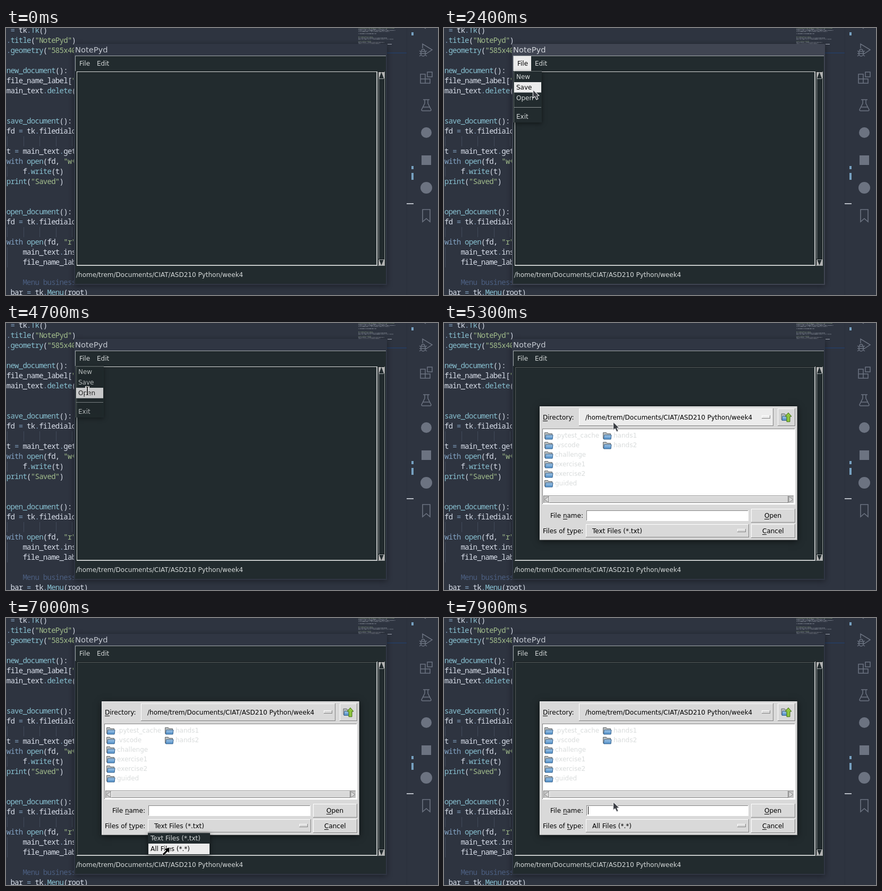
Animation of 813 by 503 pixels, one loop 8000 ms. Source, as an HTML page with a canvas:

```html
<!DOCTYPE html>
<html lang="en">
<head>
<meta charset="utf-8">
<title>Text editor demo</title>
<style>
html, body { margin: 0; width: 100%; height: 100%; overflow: hidden; background: #2e3440; }
canvas { display: block; }
</style>
</head>
<body>
<canvas id="stage" width="813" height="503"></canvas>
<script>
const g = document.getElementById('stage').getContext('2d');
const LOOP = 8000, STEP = 100;
const UI = '12px "DejaVu Sans", sans-serif';
const TITLE = '14.67px "DejaVu Sans", sans-serif';
const MONO = '14px "Noto Sans Mono", monospace';
const DARK = '#222b2e', PALE = '#d5d9d9', FACE = '#d9d9d9', HOVER = '#ececec', ICON = '#6c7381';
const PATH = '/home/trem/Documents/CIAT/ASD210 Python/week4';

// Pointer track: time, x, y
const TRACK = [
  [400, 92, 4], [1100, 150, 73], [1800, 150, 73], [2000, 166, 84], [2100, 166, 84],
  [2400, 167, 116], [2600, 167, 116], [2800, 155, 112], [3500, 155, 112], [3700, 151, 128],
  [4600, 151, 128], [4700, 153, 128], [5000, 153, 128], [5300, 318, 186], [5400, 318, 186],
  [6300, 300, 388], [6700, 300, 388], [7000, 308, 432], [7200, 308, 432], [7500, 318, 346], [8000, 318, 346]
];

const CODE = {
  0: ' = tk.Tk()', 1: '.title("NotePyd")', 2: '.geometry("585x40',
  4: 'new_document():', 5: 'file_name_label["', 6: 'main_text.delete(',
  9: 'save_document():', 10: 'fd = tk.filedialog', 12: 't = main_text.get',
  13: 'with open(fd, "w+"', 14: '    f.write(t)', 15: 'print("Saved")',
  18: 'open_document():', 19: 'fd = tk.filedialog', 21: 'with open(fd, "r"',
  22: '    main_text.insert', 23: '    file_name_label', 25: '    Menu business',
  26: '_bar = tk.Menu(root)'
};

const clamp = v => Math.max(0, Math.min(1, v));
const ramp = (t, from, to) => clamp((t - from) / (to - from));

function rect(x, y, w, h, color) {
  g.fillStyle = color;
  g.fillRect(x, y, w, h);
}

function text(s, x, y, color = '#000', font = UI, underline = -1) {
  g.font = font;
  g.fillStyle = color;
  g.fillText(s, x, y);
  if (underline < 0) return;
  const left = g.measureText(s.slice(0, underline)).width;
  g.fillRect(Math.round(x + left), y + 2, Math.round(g.measureText(s[underline]).width), 1);
}

function poly(points, fill, stroke, width = 1) {
  g.beginPath();
  points.forEach(([x, y]) => g.lineTo(x, y));
  g.closePath();
  if (fill) { g.fillStyle = fill; g.fill(); }
  if (stroke) { g.strokeStyle = stroke; g.lineWidth = width; g.stroke(); }
}

function path(d, width = 1.5) {
  g.strokeStyle = ICON;
  g.lineWidth = width;
  g.stroke(new Path2D(d));
}

function dot(x, y, r) {
  g.beginPath();
  g.arc(x, y, r, 0, 7);
  g.fillStyle = ICON;
  g.fill();
}

function bevel(x, y, w, h, fill, light = '#fff', dark = '#828282') {
  rect(x, y, w, h, dark);
  rect(x, y, w - 1, h - 1, light);
  rect(x + 1, y + 1, w - 2, h - 2, fill);
}

function shadowed(x, y, w, h, fill, blur, alpha) {
  g.save();
  g.shadowColor = `rgba(0,0,0,${alpha})`;
  g.shadowBlur = blur;
  g.shadowOffsetY = 2;
  rect(x, y, w, h, fill);
  g.restore();
}

function faded(alpha, draw) {
  if (alpha <= 0) return;
  g.save();
  g.globalAlpha = alpha;
  draw();
  g.restore();
}

function codeLine(row, line) {
  let col = 0;
  for (const token of line.match(/"[^"]*"?|\w+|\s+|./g)) {
    const next = line[col + token.length];
    const color = row == 25 ? '#4c5f80' : token[0] == '"' ? '#a3be8c'
      : /^(with|=|\.)$/.test(token) ? '#81a1c1' : next == '(' ? '#88c0d0' : '#d8dee9';
    for (const ch of token) text(ch, 0.7 + 7.68 * col++, 9 + 19 * row, color, MONO);
  }
}

function minimap() {
  let seed = 7;
  const random = () => (seed = seed * 16807 % 2147483647) / 2147483647;
  const ends = [730, 717, 732, 722, 0, 697, 0, 0, 690, 716, 728, 0, 686, 712, 704];
  ends.forEach((end, row) => {
    for (let x = 663; x < end; x += 2) {
      g.globalAlpha = 0.25 + 0.4 * random();
      rect(x, row * 2.05, 1 + random(), 1, row % 4 ? '#d8dee9' : '#a3be8c');
    }
  });
  g.globalAlpha = 0.7;
  rect(718, 30, 8, 1, '#d8dee9');
  g.globalAlpha = 1;
  rect(716, 46, 38, 2, '#263b5c');
}

function editor(slider) {
  rect(0, 0, 813, 503, '#2e3440');
  for (const row of [11, 20]) for (let i = 0; i < 5; i++) rect(2 + Math.round(30.6 * i), row * 19 - 5, 1, 19, '#414a5a');
  for (const row of [14, 22, 23]) rect(2, row * 19 - 5, 1, 19, '#414a5a');
  for (const row in CODE) codeLine(row, CODE[row]);
  minimap();
  rect(754, 0, 1, 503, '#2a303b');
  faded(slider, () => rect(754, 0, 14, 144, '#343c50'));
  for (const [y, h] of [[8, 6], [260, 6], [273, 13]]) rect(763, y, 4, h, '#76a0c0');
  rect(754, 330, 13, 2, '#b7bcc4');
  activityBar();
}

function activityBar() {
  path('M785 -2L790 1');
  path('M784 38V30L802 41L790 49M781 44H789V49A4 4 0 0 1 781 49ZM778 43L781 45M792 43L789 45M778 48H792M778 53L781 51M792 53L789 51M782 43A3 3 0 0 1 788 43');
  path('M780 87H789V96H798V104H780ZM780 96H789V104M793 83H802V92H793Z');
  path('M785 135H797M788 135V142L782 154Q782 156 784 156H798Q800 156 800 154L794 142V135M785 149H797');
  dot(791, 197, 10);
  rect(782, 240, 18, 18, ICON);
  dot(791, 301, 11);
  path('M784 342H798V365L791 359L784 365Z', 1.6);
}

function mainWindow(active, focused) {
  const frame = active ? '#404552' : '#303643';
  shadowed(128, 30, 589, 454, frame, 10, 0.4);
  text('NotePyd', 130, 46, active ? '#d3d7dd' : '#c3c8d0', TITLE);
  rect(130, 52, 585, 430, DARK);
  rect(130, 52, 585, 1, '#a5abac');
  rect(130, 52, 1, 29, '#a5abac');
  text('File', 138, 71, PALE);
  text('Edit', 171, 71, PALE);

  bevel(133, 82, 566, 366, DARK, focused ? '#e6e8e8' : '#11181a', '#e6e8e8');
  if (focused) bevel(134, 83, 564, 364, DARK, '#11181a', '#a0a5a6');
  else bevel(134, 83, 564, 364, DARK, '#59605f', '#a0a5a6');

  bevel(700, 82, 13, 366, '#b3b3b3', '#11181a', '#a0a5a6');
  poly([[706.5, 83], [711, 95], [702, 95]], DARK);
  poly([[702, 436], [711, 436], [706.5, 447]], DARK);
  bevel(701, 95, 11, 341, DARK, '#a5abac', '#11181a');
  rect(701, 436, 11, 1, '#a5abac');
  text(PATH, 132, 469, PALE);
}

function fileMenu(item) {
  shadowed(132, 82, 52, 96, DARK, 8, 0.5);
  rect(131, 81, 1, 97, '#687071');
  rect(132, 81, 52, 1, '#687071');
  rect(132, 149, 51, 1, '#8d9394');
  if (item >= 0) {
    rect(132, 82 + 20 * item, 51, 20, HOVER);
    rect(132, 101 + 20 * item, 51, 1, '#8d9394');
  }
  ['New', 'Save', 'Open'].forEach((s, i) => text(s, 136, 96 + 20 * i, i == item ? '#000' : PALE));
  text('Exit', 136, 171, PALE);
}

function folder(x, y) {
  poly([[x, y + 1], [x + 6, y + 1], [x + 7, y + 3], [x + 14, y + 3], [x + 14, y + 12], [x, y + 12]], '#b8bcbc', '#62686c');
  const blue = g.createLinearGradient(0, y + 5, 0, y + 13);
  blue.addColorStop(0, '#a9cbea');
  blue.addColorStop(1, '#5290c8');
  poly([[x + 2, y + 5.5], [x + 15.5, y + 5.5], [x + 14.5, y + 13.5], [x + 1, y + 13.5]], blue, '#34608c');
}

function optionButton(x, y, w, h, label, hovered) {
  bevel(x, y, w, h, hovered ? HOVER : FACE);
  text(label, x + 12, y + Math.floor(h / 2) + 5);
  bevel(x + w - 22, y + Math.floor(h / 2) - 3, 16, 6, hovered ? HOVER : FACE);
}

function button(y, label, x) {
  bevel(578, y, 83, 26, FACE);
  text(label, x, y + 17, '#000', UI, 0);
}

function dialog(type, caret, over) {
  shadowed(180, 157, 485, 252, FACE, 12, 0.6);
  bevel(180, 157, 485, 252, FACE, '#eee', '#a0a0a0');
  text('Directory:', 186, 182, '#000', UI, 0);
  optionButton(254, 161, 366, 33, PATH, over(254, 161, 366, 33));
  bevel(628, 161, 33, 33, FACE);
  folder(635, 170);
  poly([[648, 169], [654, 176], [651, 176], [651, 186], [645, 186], [645, 176], [642, 176]], '#8fc63d', '#3f6b12');

  bevel(185, 199, 476, 143, '#fff', '#828282', '#fff');
  ['.pytest_cache', '.vscode', 'challenge', 'exercise1', 'exercise2', 'guided', 'hands1', 'hands2'].forEach((name, i) => {
    const x = i < 6 ? 189 : 299, y = 205 + 18 * (i % 6);
    folder(x + 0.5, y + 0.5);
    text(name, x + 20, y + 11, '#d9dcdc');
  });
  bevel(187, 325, 472, 15, '#c3c3c3', '#828282', '#fff');
  bevel(198, 326, 450, 13, FACE);
  poly([[189, 332.5], [197, 327], [197, 338]], FACE, '#8a8a8a');
  poly([[657, 332.5], [649, 327], [649, 338]], FACE, '#8a8a8a');

  text('File name:', 200, 367, '#000', UI, 5);
  bevel(268, 353, 305, 20, '#fff', '#828282', '#fff');
  if (caret) rect(271, 355, 1, 15, '#000');
  text('Files of type:', 186, 396, '#000', UI, 9);
  optionButton(267, 379, 307, 25, type, over(267, 379, 307, 25));
  button(350, 'Open', 603);
  button(379, 'Cancel', 599);
}

function typeMenu(item) {
  shadowed(267, 405, 117, 41, DARK, 8, 0.55);
  if (item >= 0) rect(268, 405 + 20 * item, 115, 20, HOVER);
  ['Text Files (*.txt)', 'All Files (*.*)'].forEach((s, i) => text(s, 272, 419 + 20 * i, i == item ? '#000' : PALE));
}

function pointerAt(t) {
  const i = Math.max(1, TRACK.findIndex(k => k[0] >= t));
  const [t0, x0, y0] = TRACK[i - 1], [t1, x1, y1] = TRACK[i];
  const k = ramp(t, t0, t1);
  return [x0 + (x1 - x0) * k, y0 + (y1 - y0) * k];
}

function pointer(x, y, shape) {
  g.save();
  g.translate(Math.round(x), Math.round(y));
  g.lineJoin = 'round';
  if (shape == 'beam') {
    rect(-4, -9, 8, 3, '#eee');
    rect(-4, 6, 8, 3, '#eee');
    rect(-2, -8, 4, 16, '#eee');
    rect(-3, -8, 6, 1, '#222');
    rect(-3, 7, 6, 1, '#222');
    rect(-1, -8, 2, 16, '#222');
  } else if (shape == 'right') {
    poly([[0, 0], [-1, 11], [-4, 8], [-11, 16], [-14, 13], [-7, 6], [-11, 3]], '#000', '#fff', 0.8);
  } else {
    poly([[0.5, 0.5], [0.5, 16], [4, 13], [7, 19], [10, 17.5], [7.5, 12], [12, 11.5]], '#3b3e44', '#e4e5e7', 1.2);
  }
  g.restore();
}

function draw(t) {
  const [x, y] = pointerAt(t);
  const over = (l, top, w, h) => t >= 5100 && t < 6500 && x >= l && x < l + w && y >= top && y < top + h;
  const active = (t >= 1000 && t < 4700) || (t >= 7400 && t < 7700);

  editor(t < 1200 ? ramp(t, 300, 600) : 1 - ramp(t, 1300, 1700) ** 2);
  mainWindow(active, t < 4800);

  if (t >= 1100 && t < 4700) {
    rect(131, 53, 33, 28, HOVER);
    text('File', 138, 71);
  }
  const menuAlpha = t < 4600 ? ramp(t, 1290, 1500) : 1 - ramp(t, 4660, 4880);
  faded(menuAlpha, () => fileMenu(t < 2200 ? -1 : Math.min(2, Math.floor((y - 82) / 20))));

  const type = t < 7400 ? 'Text Files (*.txt)' : 'All Files (*.*)';
  const caret = t < 5200 || t >= 7700;
  faded(ramp(t, 4740, 4900), () => dialog(type, caret, over));

  const popupAlpha = t < 7200 ? ramp(t, 6340, 6500) : 1 - ramp(t, 7250, 7450);
  faded(popupAlpha, () => typeMenu(t >= 7200 ? 1 : Math.floor((y - 405) / 20)));

  if (t < 400) return;
  const beam = t < 900 || (t >= 4700 && t < 5100) || over(268, 353, 305, 20);
  pointer(x, y, beam ? 'beam' : t >= 6500 && t < 7400 ? 'right' : 'arrow');
}

const start = performance.now();
function tick() {
  const t = (performance.now() - start) % LOOP;
  draw(Math.floor(t / STEP) * STEP);
  requestAnimationFrame(tick);
}
tick();
</script>
</body>
</html>
```
